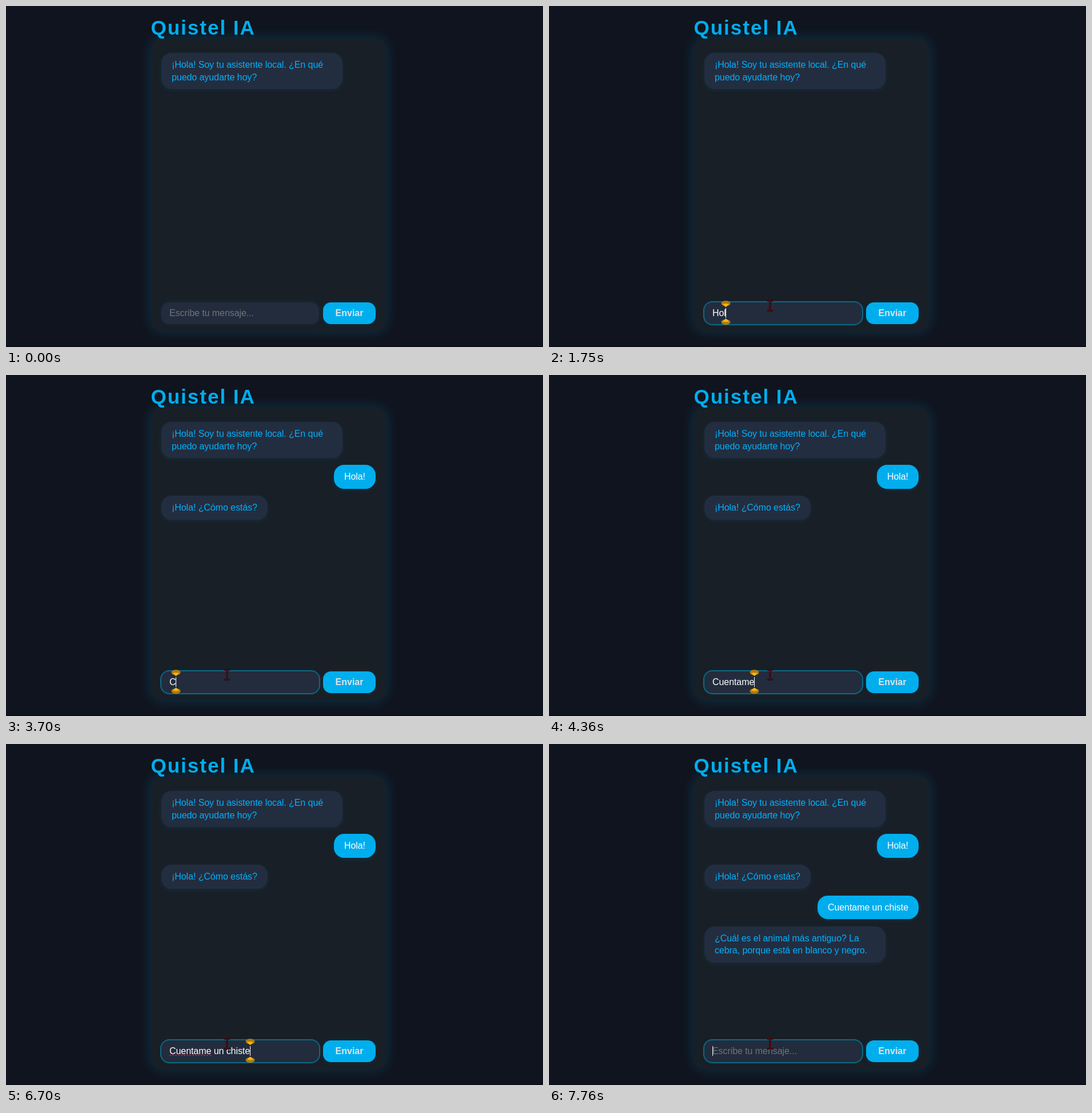
Animation, 940 px wide and 596 px high, one loop 8000 ms. Source, as an HTML page:

```html
<!DOCTYPE html>
<html lang="es">
<head>
<meta charset="utf-8">
<title>Quistel IA</title>
<style>
  :root { --cyan: #00aeee; --field: #222c3d; --glow: rgba(0, 174, 238, .1); }
  * { box-sizing: border-box; }
  html, body { margin: 0; width: 100%; height: 100%; overflow: hidden; background: #10141e; }
  body { position: relative; font: 16px/21.6px "Liberation Sans", Arial, sans-serif; }
  #stage { position: absolute; left: 0; top: 0; width: 940px; height: 596px; overflow: hidden; border-bottom: 2px solid #0b0e15; }
  h1, .panel, .msg, #field, .send, svg { position: absolute; }
  h1 { left: 253.5px; top: 18px; margin: 0; font-size: 35px; line-height: 40px; letter-spacing: 2px; color: var(--cyan); white-space: nowrap; }
  .panel { left: 254px; top: 57px; width: 411px; height: 511px; border-radius: 18px; background: #181f27; box-shadow: 0 0 24px rgba(0, 174, 238, .22); }
  .msg, #field { letter-spacing: -.07px; }
  .msg { left: 272px; padding: 10px 18px; border-radius: 18px; background: #232d40; color: #00b2fc; white-space: nowrap; box-shadow: 0 2px 8px var(--glow); }
  .wide { width: 317px; }
  .user { left: auto; right: 293px; background: var(--cyan); color: #fff; }
  #field { left: 272px; top: 518px; width: 275.5px; height: 38px; padding-left: 14px; border-radius: 14px; background: var(--field); color: #fff; line-height: 38px; white-space: pre; }
  #field::before { content: ""; position: absolute; inset: 0; border-radius: 14px; box-shadow: 0 0 8px var(--glow), 0 0 0 var(--ring, 0px) #0e6781; }
  #hint { position: absolute; left: 14px; color: #717377; }
  #typed { position: relative; }
  #squiggle { position: absolute; left: 14px; top: 25px; width: 73px; height: 2px; background: repeating-linear-gradient(90deg, #c8102e 0 3px, transparent 3px 5px); }
  #caret { position: absolute; top: 10px; width: 1px; height: 17px; background: #fff; }
  .send { left: 555px; top: 518px; width: 92px; height: 38px; border-radius: 14px; background: var(--cyan); color: #e0e3e6; font-weight: bold; line-height: 38px; text-align: center; box-shadow: 0 0 8px var(--glow); }
  svg { left: 0; top: 0; }
</style>
</head>
<body>
<div id="stage">
  <h1>Quistel IA</h1>
  <div class="panel"></div>
  <div class="msg wide" style="top:82px">¡Hola! Soy tu asistente local. ¿En qué<br>puedo ayudarte hoy?</div>
  <div class="msg user" style="top:157px" data-from="2430">Hola!</div>
  <div class="msg" style="top:211px" data-from="3030">¡Hola! ¿Cómo estás?</div>
  <div class="msg user" style="top:264.6px" data-from="6770">Cuentame un chiste</div>
  <div class="msg wide" style="top:318.6px" data-from="7360">¿Cuál es el animal más antiguo? La<br>cebra, porque está en blanco y negro.</div>
  <div id="field"><span id="hint">Escribe tu mensaje...</span><span id="typed"></span><i id="squiggle"></i><i id="caret"></i></div>
  <div class="send">Enviar</div>
  <svg width="940" height="596">
    <defs>
      <g id="drop">
        <ellipse cy="-16.3" rx="8" ry="4.7" fill="#b07c12"/>
        <path d="M-5.5-15Q0-17 5.5-15L0-10Z" fill="#ffb60a"/>
      </g>
    </defs>
    <g id="marker">
      <use href="#drop"/>
      <use href="#drop" transform="scale(1 -1)"/>
    </g>
    <g id="beam" fill="none">
      <path d="M-5-8.5H5M-5 8.5H5M0-8.5V8.5" stroke="#190a10" stroke-width="3"/>
      <path d="M-4.5-8.5H4.5M-4.5 8.5H4.5M0-8.5V8.5" stroke="#640812" stroke-width="1.4"/>
    </g>
    <path id="arrow" d="M0 0V16L4 12.5L6.5 18L9 17L6.5 11.5H11.5Z" fill="#190a10" stroke="#640812"/>
  </svg>
</div>
<script>
const LOOP = 8000;
const $ = id => document.getElementById(id);
const field = $('field'), hint = $('hint'), typed = $('typed'), squiggle = $('squiggle');
const caret = $('caret'), marker = $('marker'), beam = $('beam'), arrow = $('arrow');
const messages = [...document.querySelectorAll('[data-from]')];

const typing = [
  [0, ''], [1420, 'H'], [1560, 'Ho'], [1690, 'Hol'], [1880, 'Hola'], [2150, 'Hola!'], [2430, ''],
  [3700, 'C'], [3890, 'Cu'], [4030, 'Cuen'], [4090, 'Cuent'],
  [4230, 'Cuenta'], [4300, 'Cuentam'], [4360, 'Cuentame'], [4690, 'Cuentame '],
  [4950, 'Cuentame u'], [5150, 'Cuentame un'], [5290, 'Cuentame un '], [5420, 'Cuentame un c'],
  [5550, 'Cuentame un ch'], [5770, 'Cuentame un chs'], [6150, 'Cuentame un ch'],
  [6300, 'Cuentame un chi'], [6440, 'Cuentame un chis'], [6570, 'Cuentame un chist'],
  [6700, 'Cuentame un chiste'], [6770, '']
];
const caretOn = [[750, 1280], [1420, 2690], [3230, 7230], [7760, LOOP]];
const path = [
  [190, 462, 590], [320, 450, 566], [450, 405, 562], [600, 368, 544], [740, 362, 530], [815, 362, 530], [880, 387, 524]
];

const show = (el, on) => { el.style.display = on ? '' : 'none'; };
const last = (list, t) => list.filter(row => row[0] <= t).pop();

function pointer(t) {
  const a = last(path, t);
  const b = path[path.indexOf(a) + 1];
  if (!b) return a.slice(1);
  const k = (t - a[0]) / (b[0] - a[0]);
  return [1, 2].map(i => a[i] + (b[i] - a[i]) * k);
}

function draw(t) {
  for (const m of messages) show(m, t >= +m.dataset.from);

  const text = last(typing, t)[1];
  if (typed.textContent !== text) typed.textContent = text;
  const x = 14 + typed.getBoundingClientRect().width;
  show(hint, !text);
  show(squiggle, t >= 4750 && text);
  show(caret, caretOn.some(([from, to]) => t >= from && t < to));
  caret.style.left = Math.floor(x) + 'px';
  show(marker, text);
  marker.setAttribute('transform', `translate(${Math.floor(x) + 272.5} 536.2)`);
  field.style.setProperty('--ring', t < 750 ? '0px' : t < 880 ? '1.5px' : '2px');

  const moving = t >= 190;
  // The pointer advances in steps of about 70 ms.
  const [px, py] = moving ? pointer(t < 880 ? 190 + Math.floor((t - 190) / 69) * 69 : t) : [0, 0];
  const inside = py < 556;
  show(beam, moving && inside);
  show(arrow, moving && !inside);
  for (const el of [beam, arrow]) el.setAttribute('transform', `translate(${px} ${py})`);
}

function frame() {
  draw(performance.now() % LOOP);
  requestAnimationFrame(frame);
}
frame();
</script>
</body>
</html>
```
